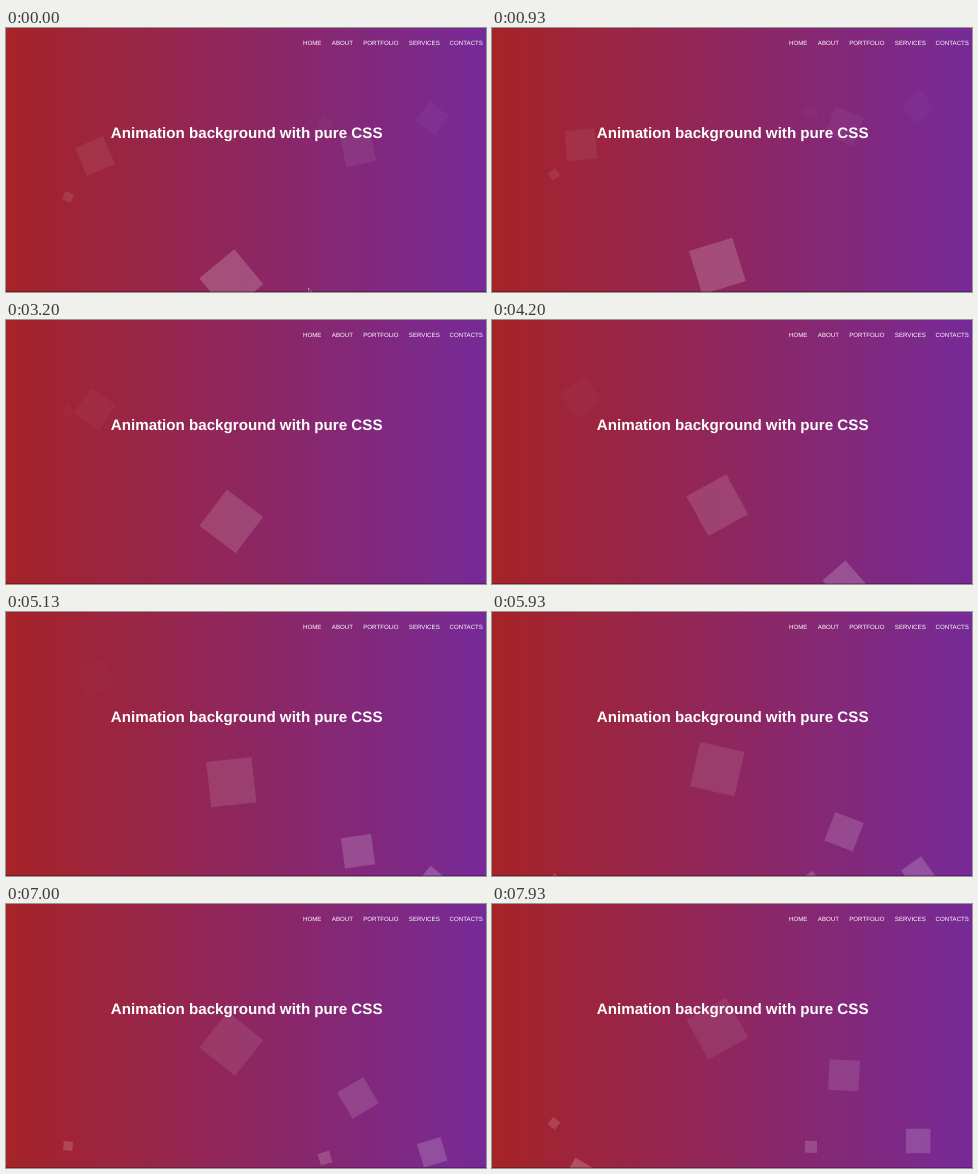
An HTML page for the animation above (8 s loop, 480 by 264 pixels).

```html
<!DOCTYPE html>
<html lang="en">
<head>
<meta charset="utf-8">
<title>Animation background</title>
<style>
  html, body { margin: 0; width: 100%; height: 100%; overflow: hidden; }
  body { background: linear-gradient(to right, #a62327, #762a98); }
  svg { display: block; width: 100vw; height: 100vh; }
  text {
    fill: #fff;
    font-family: "Liberation Sans", Arial, sans-serif;
    text-rendering: geometricPrecision;
  }
  nav, .menu { font-size: 6.15px; }
  .title { font-size: 15.15px; font-weight: bold; }
</style>
</head>
<body>
<svg viewBox="0 0 480 264">
  <g id="squares" fill="#fff"></g>
  <path id="pointer" d="M302.5 260v4h3.2z" fill="#222" stroke="#ccc" stroke-width=".5"/>
  <rect y="263" width="480" height="1" fill="#000" opacity=".25"/>
  <g class="menu">
    <text x="297" y="17.2">HOME</text>
    <text x="325.8" y="17.2">ABOUT</text>
    <text x="357.2" y="17.2">PORTFOLIO</text>
    <text x="402.8" y="17.2">SERVICES</text>
    <text x="443.6" y="17.2">CONTACTS</text>
  </g>
  <text class="title" x="104.8" y="109.6">Animation background with pure CSS</text>
</svg>
<script>
  const LOOP = 8, FPS = 15;
  const FLOOR = 310, RISE = 243, ALPHA = 0.22;

  // x: centre, start: second at which a rise begins, duration: seconds per rise
  const squares = [
    { x: 225.3, size: 45.5, start: -2.1, duration: 15 },
    { x: 89, size: 30.5, start: 6.28, duration: 20 },
    { x: 62, size: 9.2, start: 4.39, duration: 10 },
    { x: 352, size: 30.5, start: 2.85, duration: 10 },
    { x: 426.2, size: 24.5, start: 2.93, duration: 20 },
    { x: 319, size: 12, start: 2.9, duration: 20 }
  ];

  const layer = document.getElementById('squares');
  const pointer = document.getElementById('pointer');

  for (const s of squares) {
    s.node = document.createElementNS('http://www.w3.org/2000/svg', 'rect');
    s.node.setAttribute('x', -s.size / 2);
    s.node.setAttribute('y', -s.size / 2);
    s.node.setAttribute('width', s.size);
    s.node.setAttribute('height', s.size);
    layer.append(s.node);
  }

  function draw() {
    const now = performance.now() / 1000 % LOOP;
    const time = Math.floor(now * FPS + 0.1) / FPS;
    for (const { x, size, start, duration, node } of squares) {
      const turns = (time - start) / duration;
      const p = turns - Math.floor(turns);
      const y = FLOOR - size / 2 - RISE * p;
      node.setAttribute('transform', `translate(${x} ${y}) rotate(${360 * p})`);
      node.setAttribute('opacity', ALPHA * (1 - p));
    }
    pointer.setAttribute('opacity', time < 0.5 ? 1 : 0);
    requestAnimationFrame(draw);
  }
  draw();
</script>
</body>
</html>
```
